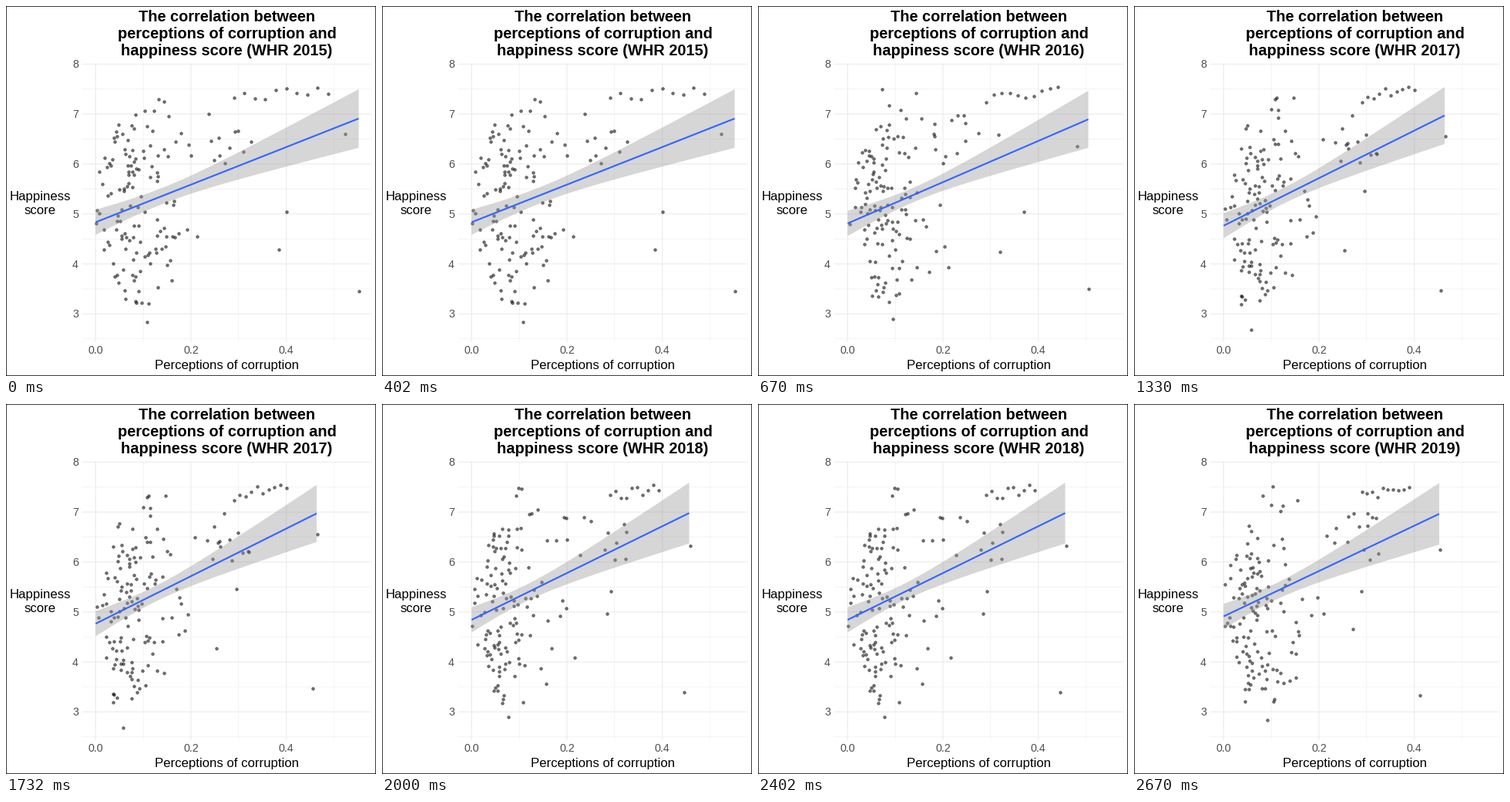
Animation, 480 px wide and 480 px high, one loop 3.33 s. Source, as a matplotlib script:

```python
import numpy as np
import matplotlib.pyplot as plt
from matplotlib.animation import FuncAnimation
from matplotlib.patches import Polygon, Rectangle

SIZE, DPI = 480, 96
PX = 72 / DPI                      # points per pixel
STEP, LOOP = 10, 3330              # ms
STARTS = [0, 670, 1330, 2000, 2670]
COUNTRIES = 156
TOP, BOTTOM, LEFT, RIGHT = 74.2, 435.8, 99, 474.6

# Per year: band end x, trend y at both ends, mean x, band half-height at
# the end, then a few lone points (all in pixels)
YEARS = {
    2015: (457.5, 280.5, 146, 203, 38,
           [(457, 369), (439, 165), (363, 266), (353, 315), (182, 409)]),
    2016: (428.5, 282, 147, 201, 37,
           [(428, 366), (413, 181), (344, 266), (313, 318), (174, 405)]),
    2017: (403, 285, 142, 192, 37,
           [(397, 368), (403, 168), (298, 239), (272, 316), (151, 419)]),
    2018: (398.5, 280, 141.5, 185, 39.5,
           [(391, 373), (399, 183), (296, 242), (291, 271), (163, 405)]),
    2019: (396, 275.5, 142.5, 184, 40,
           [(370, 377), (396, 188), (294, 242), (283, 291), (172, 409)]),
}

plt.rcParams["font.family"] = "Liberation Sans"


def sx(v):
    return 116.3 + 618.4 * v


def sy(v):
    return 399.4 - 64.8 * (v - 3)


def patch(rng, n, x0, x1, y0, y1):
    """n points spread evenly over a box."""
    return list(zip(rng.uniform(x0, x1, n), rng.uniform(y0, y1, n)))


def cloud(rng, n, mean):
    """Dense left part: wide in the middle, narrow at zero, few overlaps."""
    pts = []
    while len(pts) < n:
        x, y = rng.normal(mean, 27), rng.uniform(152, 366)
        inside = 116 < x < 222 and abs(y - 258) < 42 + 2.2 * (x - 116)
        if inside and all(np.hypot(x - a, y - b) > 3.5 for a, b in pts):
            pts.append((x, y))
    return pts


def countries(year, end, mean, lone):
    rng = np.random.default_rng(year)
    t = np.linspace(0, 1, 10)
    top_x = 295 + (end - 335) * t
    top_y = 118 - 11 * t + rng.uniform(-7, 7, t.size)
    pts = lone + list(zip(top_x, top_y))
    pts += patch(rng, 14, 225, 320, 138, 205)    # upper middle
    pts += patch(rng, 6, 160, 212, 106, 146)     # upper left
    pts += patch(rng, 6, 205, 250, 250, 345)     # lower middle
    pts += patch(rng, 7, 135, 185, 366, 388)     # lower left
    pts += cloud(rng, COUNTRIES - len(pts), 0.5 * mean + 58)
    return np.floor(pts) + 0.5


def band(end, y0, y1, mean, h1, h0=16.3):
    """Regression line and its hyperbolic confidence band."""
    x = np.linspace(sx(0), end, 80)
    y = np.interp(x, [x[0], end], [y0, y1])
    b = (h1**2 - h0**2) / ((end - mean)**2 - (x[0] - mean)**2)
    h = np.sqrt(h0**2 + b * ((x - mean)**2 - (x[0] - mean)**2))
    edge = np.r_[np.c_[x, y - h], np.c_[x, y + h][::-1]]
    return edge, ([x[0], end], [y0, y1])


scenes = []
for year, (end, y0, y1, mean, h1, lone) in YEARS.items():
    pts = countries(year, end, mean, lone)
    scenes.append((year, pts, *band(end, y0, y1, mean, h1)))

fig = plt.figure(figsize=(SIZE / DPI, SIZE / DPI), dpi=DPI, facecolor="white")
ax = fig.add_axes([0, 0, 1, 1])
ax.set(xlim=(0, SIZE), ylim=(SIZE, 0))
ax.axis("off")


def label(x, y, text, size, color="black", ha="center", **kw):
    return ax.text(x, y, text, size=size * PX, color=color, ha=ha,
                   va="baseline", **kw)


def heading(y, text):
    return label(286.5, y, text, 20, weight="bold")


def grid(xs, ys, width):
    style = dict(color="#EBEBEB", lw=width * PX, zorder=1, snap=False,
                 solid_capstyle="butt")
    for x in xs:
        ax.plot([sx(x)] * 2, [TOP, BOTTOM], **style)
    for y in ys:
        ax.plot([LEFT, RIGHT], [sy(y)] * 2, **style)


grid([0.1, 0.3, 0.5], np.arange(2.5, 8), 0.55)
grid([0, 0.2, 0.4], range(3, 9), 1.1)

for v in (0, 0.2, 0.4):
    label(sx(v), 451, f"{v:.1f}", 14.2, "#4D4D4D")
for v in range(3, 9):
    label(94, sy(v) + 5, str(v), 14.2, "#4D4D4D", "right")

label(286.5, 471, "Perceptions of corruption", 16.8)
label(44, 252, "Happiness", 16.8)
label(44, 270, "score", 16.8)
heading(20, "The correlation between")
heading(42, "perceptions of corruption and")
title = heading(64, "")

dots = ax.scatter([], [], s=(3.5 * PX)**2, facecolor=(0, 0, 0, 0.5),
                  edgecolor=(0, 0, 0, 0.5), linewidth=PX, zorder=2)
ribbon = ax.add_patch(Polygon([(0, 0), (1, 1), (1, 0)], facecolor="#999999",
                              alpha=0.4, lw=0, zorder=3))
trend, = ax.plot([], [], color="#3366FF", lw=2.13 * PX, zorder=4,
                 solid_capstyle="butt")
ax.add_patch(Rectangle((0, 0), SIZE, SIZE, fill=False, ec="black",
                       lw=1.5 * PX, snap=False, zorder=5))


def update(i):
    k = sum(i * STEP >= s for s in STARTS) - 1
    year, pts, edge, line = scenes[k]
    title.set_text(f"happiness score (WHR {year})")
    dots.set_offsets(pts)
    ribbon.set_xy(edge)
    trend.set_data(*line)
    return title, dots, ribbon, trend


anim = FuncAnimation(fig, update, frames=LOOP // STEP, interval=STEP,
                     repeat=True, repeat_delay=0, blit=False)
plt.show()
```
